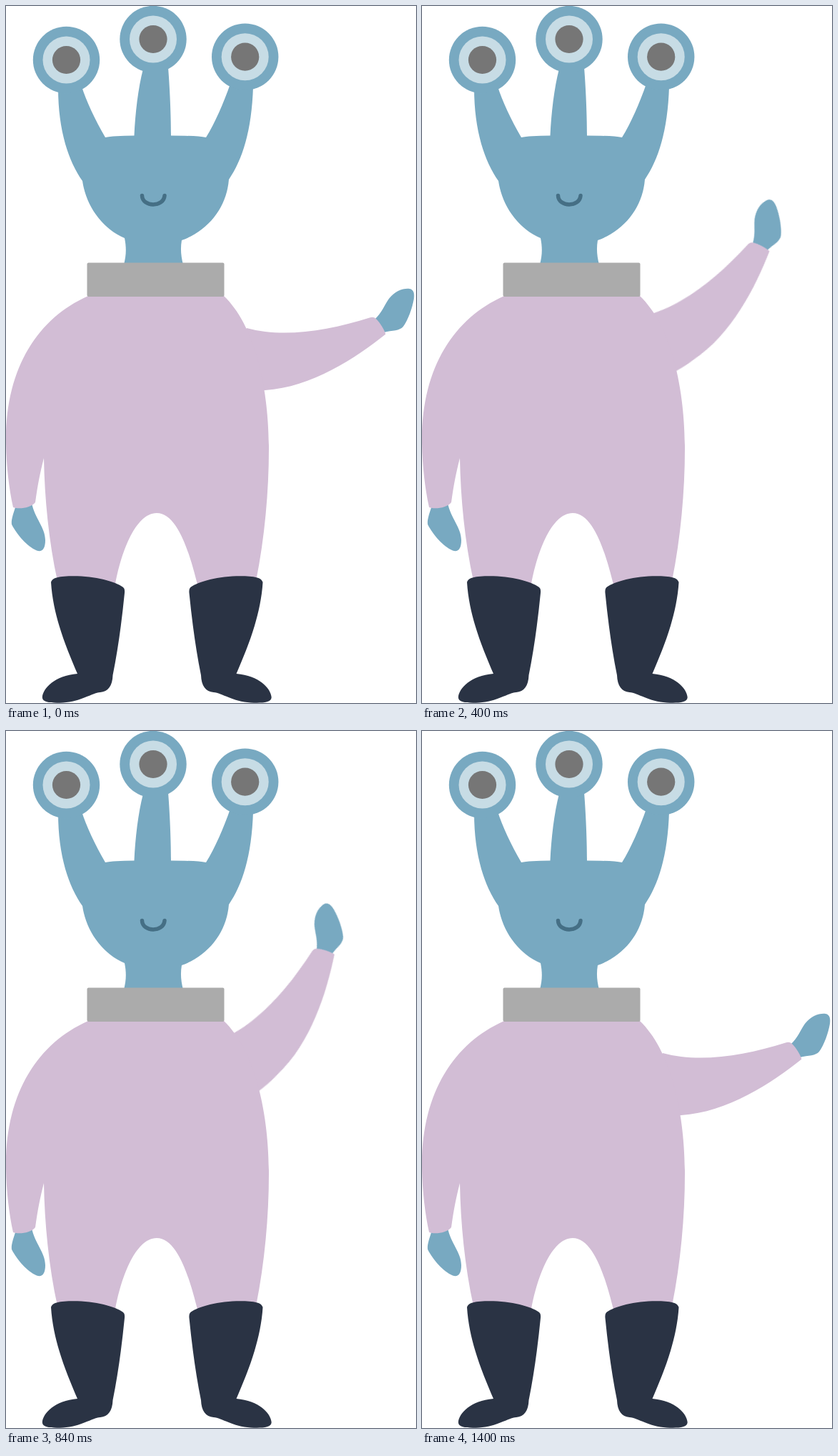
Animation, 574 px wide and 976 px high, one loop 1440 ms. Source, as an HTML page:

```html
<!DOCTYPE html>
<html lang="en">
<head>
<meta charset="utf-8">
<title>Waving alien</title>
<style>
  html, body { margin: 0; width: 100%; height: 100%; overflow: hidden; background: #fff; }
  svg { display: block; width: 100vw; height: 100vh; }
  .skin { fill: #78a9c1; }
  .suit { fill: #d2bdd5; }
  .boot { fill: #2a3344; }
  .iris { fill: #c7dce5; }
  .pupil { fill: #767676; }
  .collar { fill: #ababab; }
  .mouth { fill: none; stroke: #456f85; stroke-width: 5.5; stroke-linecap: round; }

  /* 40 ms ticks: 17 up, 18 down, one at rest; the small lead keeps ticks clear of rounding */
  .arm {
    transform-origin: 292.2px 485.4px;
    animation: wave 1440ms -2ms infinite;
  }
  @keyframes wave {
    0% { transform: rotate(0deg); animation-timing-function: steps(17, end); }
    47.2222% { transform: rotate(-51deg); animation-timing-function: steps(18, end); }
    97.2222%, 100% { transform: rotate(0deg); }
  }
</style>
</head>
<body>
<svg viewBox="0 0 574 976" preserveAspectRatio="none">
  <defs>
    <g id="eye">
      <circle class="skin" r="46.7"/>
      <circle class="iris" r="33"/>
      <circle class="pupil" r="19.6"/>
    </g>
    <path id="boot" class="boot" d="M63 807C65 800 75 798 100 798.3C130 799 158 808 165 815Q166.500 817 166 822C162 862 157 900 149.500 937C149 952 143 960 132 961C120 962 105 974 80 975.500C65 976 51 976 50.800 968C52 955 68 938 100 935C85 900 66 855 63 807Z"/>
  </defs>

  <!-- head, stalks and neck -->
  <path class="skin" d="M73 115C73 175 88 218 107 245C112 280 135 312 166 325C169 340 168 350 165 362H248C245 350 244 340 246 328C283 315 309 282 312 243C331 215 344 175 346 113L314 109C305 135 292 165 280 184Q267 181.500 231 181.500C231 150 229 110 227 86L192 88C185 115 181 150 179.500 181.500Q150 181.500 139 184C125 160 112 132 106 113Z"/>
  <use href="#eye" x="84.500" y="75.500"/>
  <use href="#eye" x="206" y="46.500"/>
  <use href="#eye" x="334.700" y="71.200"/>
  <path class="mouth" d="M190.500 265.500C191 282 221 282 222 265.500"/>

  <!-- resting hand -->
  <path class="skin" d="M13 702C10 712 7 720 8 726C15 740 30 757 43 762.500C50 765 55 761 55 748C55 730 40 717 36 696Z"/>

  <!-- waving arm -->
  <g class="arm">
    <path class="skin" d="M516 439C526 430 529 420 536 410C545 399 556 395 565 396C571 397 572 403 571 410C569 422 563 440 556 449C551 455 541 454 529 457Z"/>
    <path class="suit" d="M300 510L337 451C388 465 450 455 509 436.500Q514.500 434.500 518 438C524 444 529 452 531.500 459.500C490 493 427 534 363 538C345 540 330 540 318 538Z"/>
  </g>

  <!-- suit -->
  <path class="suit" d="M114 406.500C46 437 0 505 0 607C0 640 4 675 10 702C18 705 35 703 41 695C44 672 48 652 53 633C54 690 60 750 72 805L153 810C160 770 180 710 211 710C241 710 258 770 268 810L350 805C362 745 368 680 368 620C368 530 347 446 305 406Z"/>
  <rect class="collar" x="113.500" y="359.500" width="192" height="47.500" rx="2"/>
  <use href="#boot"/>
  <use href="#boot" transform="matrix(-1 0 0 1 422.500 0)"/>
</svg>
</body>
</html>
```
